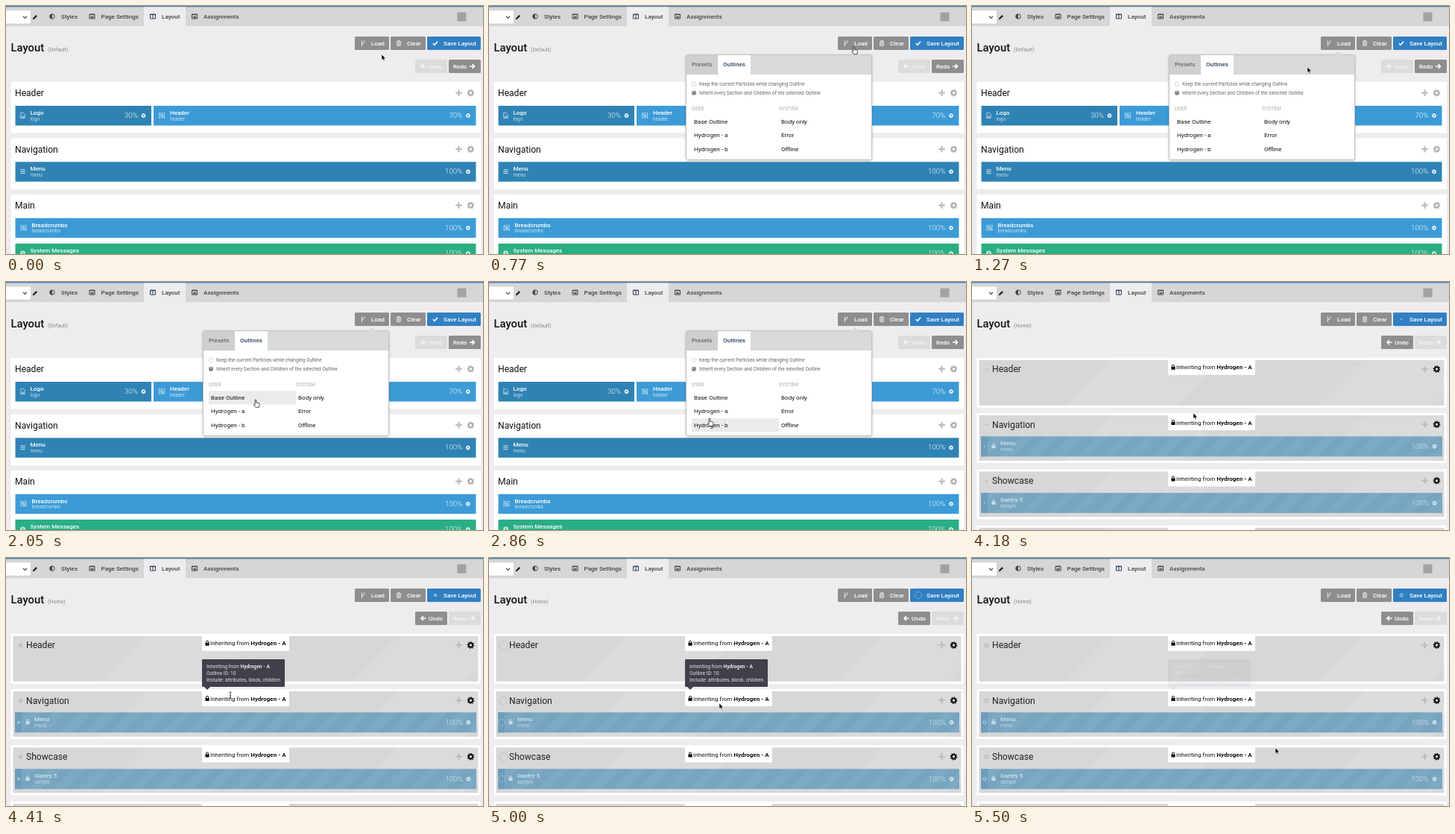
An HTML page that plays this animation: 640 by 333 pixels, repeating every 5550 ms.

```html
<!DOCTYPE html>
<html lang="en">
<head>
<meta charset="utf-8">
<title>Layout manager</title>
<style>
html, body { margin: 0; width: 100%; height: 100%; overflow: hidden; background: #eeecef; }
svg { display: block; width: 640px; height: 333px; font: 8px Roboto, sans-serif; }
text { white-space: pre; }
.m { font-weight: 500; }
.b { font-weight: 700; }
</style>
</head>
<body>
<svg id="stage" viewBox="0 0 640 333"></svg>
<script>
const LOOP = 5550, OPEN = 640, CLICK = 3400, SWAP = 4180;
const BLUE = '#3c9bd6', DARK = '#2f83b4', GREEN = '#2aae85', GREY = '#8f8d90', OFF = '#dcdbdd';

// Drawing helpers, all returning SVG markup
const rect = (x, y, w, h, fill, more = '') => `<rect x="${x}" y="${y}" width="${w}" height="${h}" fill="${fill}" ${more}/>`;
const text = (x, y, s, fill, size = 8, more = '') => `<text x="${x}" y="${y}" fill="${fill}" font-size="${size}" ${more}>${s}</text>`;
const path = (x, y, d, color, width = 1, fill = 'none') =>
  `<path transform="translate(${x} ${y})" d="${d}" fill="${fill}" stroke="${color}" stroke-width="${width}"/>`;
const group = (id, s) => `<g id="${id}">${s}</g>`;
const MEDIUM = 'class="m"';

// Icons, centred on x, y
const cog = (x, y, c, s = 1) => `<g transform="translate(${x} ${y}) scale(${s})" fill="none" stroke="${c}">
  <circle r="2.7" stroke-width="2"/><circle r="4.1" stroke-width="1.5" pathLength="16" stroke-dasharray="1"/></g>`;
const plus = (x, y) => path(x, y, 'M-4.3 0H4.3M0-4.3V4.3', '#bdbcbe', 2.2);
const pane = (x, y, c) => path(x, y, 'M-3.5-3h7v6h-7zM-3.5-2.4h7M-2 .2h4.2M-2 1.6h4.2', c);
const columns = (x, y, c) => path(x, y, 'M-3.5-3h7v6h-7zM0-3v6M-3.5-2.4h7', c);
const arrow = (x, y, dir, c) => path(x, y, `M${-3.5 * dir} 0h${6.5 * dir}M0-3L${3 * dir} 0L0 3`, c, 1.6);
const lock = (x, y, c) => path(x, y, 'M-1.5 0v-1.6a1.5 1.5 0 0 1 3 0V0', c) + rect(x - 2.6, y - .6, 5.2, 4, c, 'rx=".5"');
const frameIcon = (x, y) => path(x, y, 'M-3.5-3h7v6h-7zM-1.8-1.4h2.4v2h-2.4zM-.4-.2h2.4v1.8h-2.4z', '#b9dcf2', .8) +
  [[-4, -3.6], [3, -3.6], [-4, 2.4], [3, 2.4]].map(([a, b]) => rect(x + a, y + b, 1.2, 1.2, '#b9dcf2')).join('');
const imageIcon = (x, y) => path(x, y, 'M-2.8-3.6h3.6l2 2v5.2h-5.6zM-1.8 2.4l1.4-2 .8 1 .6-.6.8 1.6z', '#c4deee', .8);
const listIcon = (x, y) => path(x, y, 'M-3.2-2.4h6.4M-3.2 0h6.4M-3.2 2.4h6.4', '#d0e4f0');
const infoIcon = (x, y) => `<circle cx="${x}" cy="${y}" r="3.4" fill="#bfe6d9"/>` + rect(x - .5, y - 1.8, 1, 3.6, GREEN);
const pulse = (x, y, size, c) => `<circle class="pulse" data-size="${size}" cx="${x}" cy="${y}" fill="none" stroke="${c}" stroke-width=".9"/>`;

const button = (x, y, w, fill) => rect(x, y, w, 18, fill, 'rx="1.5"');
const undo = on => button(549, 72, 43, on ? GREY : OFF) + arrow(560, 81, -1, on ? '#fff' : '#f4f3f5') +
  text(567, 83.8, 'Undo', on ? '#fff' : '#f4f3f5', 8, MEDIUM);
const redo = on => button(594, 72, 43, on ? GREY : OFF) + arrow(625.5, 81, 1, on ? '#fff' : '#f4f3f5') +
  text(600, 83.8, 'Redo', on ? '#fff' : '#f4f3f5', 8, MEDIUM);

function block(x, y, w, fill, icon, name, sub, size, indent = 20) {
  const end = x + w;
  return rect(x, y, w, 26.5, fill) + icon(x + indent / 2, y + 13) +
    text(x + indent, y + 12, name, '#fff', 8, MEDIUM) + text(x + indent, y + 19.6, sub, '#fff', 6.5, 'opacity=".72"') +
    text(end - 18, y + 16, size, '#fff', 9.8, 'font-weight="300" text-anchor="end" opacity=".9"') + cog(end - 10.5, y + 13.2, '#fff', .66);
}

const card = (y, h, name) => rect(6.5, y, 630.5, h, '#fff') + text(12, y + 19, name, '#111', 12.1) +
  plus(607.5, y + 14.7) + cog(623.5, y + 14.7, '#b0afb1');

const badge = y => rect(263, y, 117, 20.5, '#fff', 'rx="1"') + lock(270, y + 10, '#111') +
  text(274, y + 13, 'Inheriting from <tspan class="b">Hydrogen - A</tspan>', '#111');

function inherited(y, name) {
  const band = x => `<path d="M${x} ${y + 63}l62-62h150l-62 62z" fill="#fff" opacity=".1"/>`;
  return rect(8, y, 627, 64, '#d7d6d8') + band(125) + band(465) +
    rect(8, y, 627, 64, 'none', 'stroke="#fff" stroke-width="3"') + badge(y + 1) +
    (name ? text(27, y + 18, name, '#222', 12.1) + pulse(19.5, y + 14, 6, '#999') + plus(607.5, y + 13.7) + cog(623.5, y + 13.7, '#111') : '');
}

const lockedBlock = (y, name, sub) => rect(12, y, 619, 27, '#7ca9c4') + rect(12, y, 619, 27, 'url(#stripes)') +
  rect(12, y, 9, 27, '#6d9dbb') + pulse(17, y + 13.5, 4.9, '#d6e6ef') + lock(29, y + 12.5, '#c9dce7') +
  text(38, y + 12, name, '#d5e4ed', 8, MEDIUM) + text(38, y + 19.8, sub, '#c3d7e3', 6.5) +
  text(613, y + 16.3, '100%', '#d5e4ed', 9.8, 'font-weight="300" text-anchor="end"') + cog(620.5, y + 13.5, '#e3eef4', .66);

const chrome = rect(0, 0, 640, 27, '#d6d5d7') + rect(0, 0, 640, 1.3, '#3a82b6') + rect(185, 1.3, 56, 26, '#eeecef') +
  rect(-5, 5.5, 38.5, 18.5, '#fff', 'rx="2" stroke="#c5c4c6" stroke-width=".6"') + path(25.5, 15, 'M-2.5-1.3L0 1.3L2.5-1.3', '#555', 1.3) +
  path(39, 15, 'M-2.6 2.6l.4-1.6L1.4-2.6l1.2 1.2L-1 2.2z', '#222', 1, '#222') +
  path(62, 14, 'M0-3.3a3.3 3.3 0 0 0 0 6.6z', '#444', 0, '#444') + `<circle cx="62" cy="14" r="3.2" fill="none" stroke="#444"/>` +
  pane(115.5, 14, '#444') + columns(197, 14, '#314459') + pane(253, 14, '#444') +
  [[74, 'Styles'], [127.5, 'Page Settings'], [209, 'Layout'], [265, 'Assignments']].map(([x, s]) => text(x, 17, s, '#444', 8.1, MEDIUM)).join('') +
  rect(605.5, 8.5, 12, 12, '#a2a1a3') +
  text(6.5, 61, 'Layout', '#111', 14.8, MEDIUM) +
  button(468, 41, 46, GREY) + button(516, 41, 47, GREY) + button(565, 41, 72, '#3180c2') +
  path(479, 50, 'M-1.6-2.4v5.2M1.8-2.4v1.2L-1.6 1', '#fff', .9) + path(479, 50, 'M-2.2-3h1.2M1.2-3h1.2M-2.2 3h1.2', '#fff', 1.2) +
  path(527, 50, 'M-3-2.3h6M-1-2.4v-1h2v1M-2.2-2v5.3h4.4V-2M-.8-.8v3M.8-.8v3', '#fff', .8) +
  text(490, 52.9, 'Load', '#fff', 8.1, MEDIUM) + text(538, 52.9, 'Clear', '#fff', 8.1, MEDIUM) + text(587, 52.9, 'Save Layout', '#fff', 8.1, MEDIUM);

const before = text(56, 61, '(Default)', '#888', 7) + path(576, 50, 'M-3 0l2 2.2L3-2.2', '#fff', 1.6) + undo(false) + redo(true) +
  card(102, 68.5, 'Header') + block(12.5, 134, 182.5, DARK, imageIcon, 'Logo', 'logo', '30%') +
  block(198, 134, 432.5, BLUE, frameIcon, 'Header', 'header', '70%', 22) +
  card(177.5, 68.5, 'Navigation') + block(12.5, 209.3, 618, DARK, listIcon, 'Menu', 'menu', '100%') +
  card(253, 90, 'Main') + block(12.5, 284.8, 618, BLUE, frameIcon, 'Breadcrumbs', 'breadcrumbs', '100%', 22) +
  block(12.5, 319, 618, GREEN, infoIcon, 'System Messages', 'system messages', '100%');

const after = text(56, 61, '(Home)', '#888', 7) + pulse(576, 50, 4.9, '#fff') + undo(true) + redo(false) +
  inherited(103.3, 'Header') + inherited(177.5, 'Navigation') + lockedBlock(207.3, 'Menu', 'menu') +
  inherited(253, 'Showcase') + lockedBlock(283.2, 'Gantry 5', 'sample') + inherited(328.5);

const rowY = i => 146.2 + 18.5 * i;
const rows = [['Base Outline', 'Body only'], ['Hydrogen - a', 'Error'], ['Hydrogen - b', 'Offline']];
const popup = rect(264.5, 65.5, 249, 141, '#fff', 'rx="2" stroke="#c4c3c5" filter="url(#shadow)"') +
  rect(265, 66, 248, 26, '#d9d8da') + rect(265, 66, 42, 26, '#cfced0') + rect(307, 66, 44, 27, '#fff') +
  path(491, 66, 'M-6 0L0-5L6 0z', 'none', 0, '#d9d8da') +
  text(272, 81, 'Presets', '#666', 8, MEDIUM) + text(314, 81, 'Outlines', '#2c4566', 8.1, MEDIUM) +
  rect(272.5, 102.3, 5, 5, '#fff', 'rx=".8" stroke="#ccc" stroke-width=".7"') +
  rect(272.5, 114.3, 5, 5, '#aaa', 'rx=".8" stroke="#888" stroke-width=".7"') + path(275, 117, 'M-1.6 0l1.2 1.3L1.8-1.5', '#333', .9) +
  text(282, 106.6, 'Keep the current Particles while changing Outline', '#666', 6.5) +
  text(282, 118.6, 'Inherit every Section and Children of the selected Outline', '#666', 6.5) +
  text(272, 139.8, 'USER', '#bbb', 6.7, MEDIUM) + text(389, 139.8, 'SYSTEM', '#bbb', 6.7, MEDIUM) +
  rect(272, 0, 117, 18, '#ebeaec', 'id="hover"') +
  rows.map(([a, b], i) => text(275, rowY(i) + 11.5, a, '#111', 8.1, `id="row${i}"`) + text(392, rowY(i) + 11.5, b, '#111', 8.1)).join('') +
  `<circle id="spinner" cx="280" cy="173.5" r="3.2" fill="none" stroke="#888" stroke-width="1.2" pathLength="16" stroke-dasharray="1"/>`;

const tooltip = rect(263, 136, 111, 37, '#413f49', 'rx="1"') + path(270, 173, 'M-4 0L0 4L4 0z', 'none', 0, '#413f49') +
  text(269, 148, 'Inheriting from <tspan class="b">Hydrogen - A</tspan>', '#e4e3e6', 6.7) +
  text(269, 157, 'Outline ID: 10', '#e4e3e6', 6.7) + text(269, 166, 'Include: attributes, block, children', '#e4e3e6', 6.7);

const pointers = group('arrow', path(0, 0, 'M0 0v7.4l1.7-1.5 1.2 2.6 1.3-.6-1.2-2.5h2.4z', '#fff', .5, '#000')) +
  group('hand', path(0, 0, 'M-.8 0q.8-.8 1.6 0v3.6l3.6.8q.8.3.7 1.3l-.6 4.3h-4.2l-3-3.6q.3-1.2 1.9-.2z', '#222', .8, '#fff')) +
  group('beam', path(0, 0, 'M-1.7-4Q0-4 0-3Q0-4 1.7-4M0-3V3M-1.7 4Q0 4 0 3Q0 4 1.7 4M-1 1h2', '#222', .8));

const stage = document.getElementById('stage');
stage.innerHTML = `<defs>
  <filter id="shadow"><feDropShadow dx="0" dy="1" stdDeviation="1.5" flood-opacity=".25"/></filter>
  <pattern id="stripes" width="34" height="34" patternUnits="userSpaceOnUse">
    <path d="M0 34L34 0H17L0 17zM34 34V17L17 34z" fill="#1d5c85" opacity=".06"/></pattern></defs>` +
  chrome + group('before', before) + group('after', after) + group('popup', popup) + group('tooltip', tooltip) + group('cursor', pointers);

const $ = id => document.getElementById(id);
const show = (id, on) => $(id).style.display = on ? '' : 'none';
const clamp = v => Math.max(0, Math.min(1, v));
const pulses = document.querySelectorAll('.pulse');

// Pointer stops: time, x, y
const stops = [[0, 504, 65], [350, 493, 54], [680, 492, 53], [1270, 450, 82], [1900, 345, 150], [2400, 299, 188],
  [2860, 296, 183.5], [3150, 296, 175], [CLICK, 297, 176], [SWAP, 297, 176], [4410, 301, 184], [5000, 309, 195],
  [5300, 313, 198], [5500, 407, 255], [LOOP, 414, 259]];

function pointerAt(t) {
  const i = stops.findIndex(s => s[0] > t), [t0, x0, y0] = stops[i - 1], [t1, x1, y1] = stops[i];
  const p = (t - t0) / (t1 - t0), e = p * p * (3 - 2 * p);
  return [x0 + (x1 - x0) * e, y0 + (y1 - y0) * e];
}

function draw(now) {
  const t = now % LOOP, [x, y] = pointerAt(t);
  const swapped = t >= SWAP, open = t >= OPEN && !swapped, loading = t >= CLICK && !swapped;
  const inside = (l, top, r, bottom) => x >= l && x < r && y >= top && y < bottom;
  const row = open && inside(272, 146, 506, 201) ? Math.min(2, Math.floor((y - 146) / 18.5)) : -1;

  show('before', !swapped);
  show('after', swapped);
  show('popup', open);
  show('hover', row >= 0 && x < 389);
  $('hover').setAttribute('y', rowY(Math.max(0, row)));
  show('spinner', loading);
  $('spinner').setAttribute('transform', `rotate(${Math.floor(t / 125) * 45} 280 173.5)`);
  $('row1').setAttribute('x', loading ? 287.5 : 275);

  const phase = (t - SWAP) / 1000 % 1;
  if (swapped) for (const c of pulses) {
    c.setAttribute('r', c.dataset.size * (phase + .08));
    c.setAttribute('opacity', 1 - phase * .8);
  }
  $('tooltip').setAttribute('opacity', clamp((t - 4260) / 80) * clamp((5510 - t) / 160));

  const beam = swapped && inside(274, 180, 376, 194);
  const hand = !loading && !swapped && (row >= 0 || inside(468, 41, 514, 59));
  $('cursor').setAttribute('transform', `translate(${x} ${y})`);
  show('beam', beam);
  show('hand', hand);
  show('arrow', !beam && !hand);
}

const start = performance.now();
function tick() {
  draw(performance.now() - start);
  requestAnimationFrame(tick);
}
tick();
</script>
</body>
</html>
```
